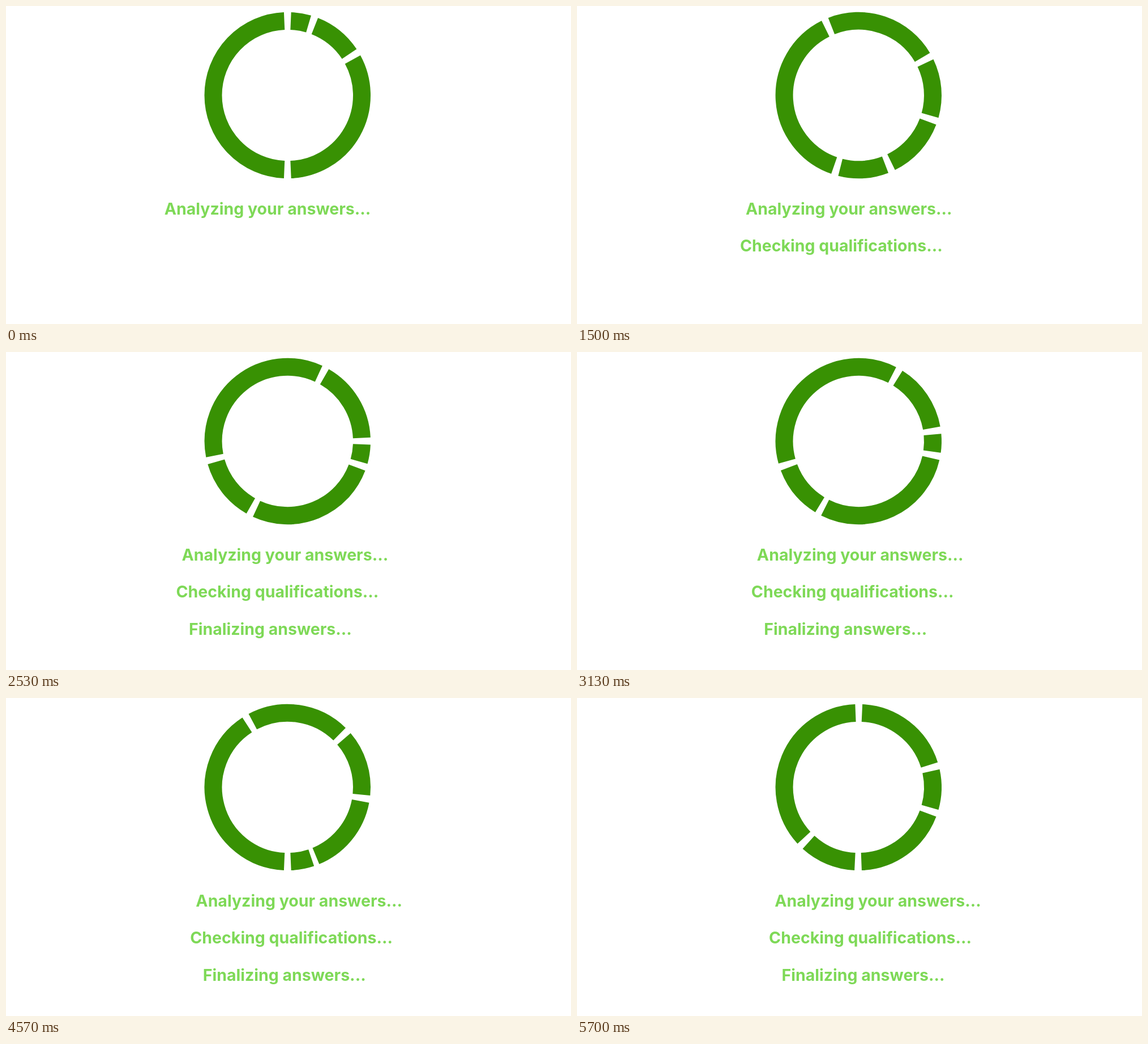
Animation of 998 by 561 pixels, one loop 5730 ms. Source, as an HTML page:

```html
<!DOCTYPE html>
<html lang="en">
<head>
<meta charset="utf-8">
<title>Progress ring</title>
<style>
  html, body { margin: 0; width: 100%; height: 100%; overflow: hidden; background: #fff; }
  svg { display: block; width: 100%; height: 100%; }
  #ring path { fill: none; stroke: #389103; stroke-width: 31; }
  text { font: 700 28.5px Inter, "Open Sans", sans-serif; fill: #7ed957; text-anchor: middle; }
</style>
</head>
<body>
<svg viewBox="0 0 998 561">
  <g id="ring"></g>
  <g id="lines">
    <text x="462" y="367.5">Analyzing your answers...</text>
    <text x="448.5" y="433">Checking qualifications...</text>
    <text x="436" y="498.5">Finalizing answers...</text>
  </g>
</svg>
<script>
const LOOP = 5730, STEP = 100 / 3, CYCLE = 112;
const CX = 497.3, CY = 157.5, R = 131.2, GAP = 2.5;
const DRIFT = 12.2; // px per second
const SHOW = [0, 30, 60]; // step at which each line appears

// Divider angles in degrees, clockwise from the top; the last value
// scales the gap before the segment that opens at the bottom.
const POSES = {
  start: [0, 19, 58.8, 180, 180, 0],
  spread: [-38.2, 54, 108.2, 142.3, 180, 1],
  turned: [34.9, 94, 108.2, 214.7, 265.3, 1]
};

const quadIn = u => u * u;
const smooth = u => u * u * (3 - 2 * u);
const MOVES = [
  { from: 'start', to: 'spread', begin: 0, end: 28, ease: quadIn, late: 17 },
  { from: 'spread', to: 'turned', begin: 28, end: 88, ease: smooth },
  { from: 'turned', to: 'start', begin: 88, end: CYCLE, ease: smooth }
];
const LATE_PARTS = [3, 5];

function poseAt(step) {
  const m = MOVES.find(v => step < v.end);
  return POSES[m.from].map((a, i) => {
    const begin = m.late && LATE_PARTS.includes(i) ? m.late : m.begin;
    const u = Math.max(0, (step - begin) / (m.end - begin));
    return a + (POSES[m.to][i] - a) * m.ease(u);
  });
}

function point(deg) {
  const r = deg * Math.PI / 180;
  return (CX + R * Math.sin(r)).toFixed(2) + ' ' + (CY - R * Math.cos(r)).toFixed(2);
}

function arc(from, to) {
  if (to <= from) return '';
  return `M${point(from)}A${R} ${R} 0 ${to - from > 180 ? 1 : 0} 1 ${point(to)}`;
}

const ring = document.getElementById('ring');
const segments = Array.from({ length: 5 }, () =>
  ring.appendChild(document.createElementNS('http://www.w3.org/2000/svg', 'path')));
const group = document.getElementById('lines');
const lines = [...group.children];

function draw(ms) {
  const step = Math.floor((ms % LOOP + 3.4) / STEP);
  const pose = poseAt(step % CYCLE);
  segments.forEach((s, i) => {
    const lead = i === 3 ? GAP * pose[5] : GAP;
    const next = i < 4 ? pose[i + 1] : pose[0] + 360;
    s.setAttribute('d', arc(pose[i] + lead, next - GAP));
  });
  group.setAttribute('transform', `translate(${(step * STEP / 1000 * DRIFT).toFixed(2)} 0)`);
  lines.forEach((l, i) => l.setAttribute('visibility', step >= SHOW[i] ? 'visible' : 'hidden'));
}

const t0 = performance.now();
function tick() {
  draw(performance.now() - t0);
  requestAnimationFrame(tick);
}
tick();
</script>
</body>
</html>
```
